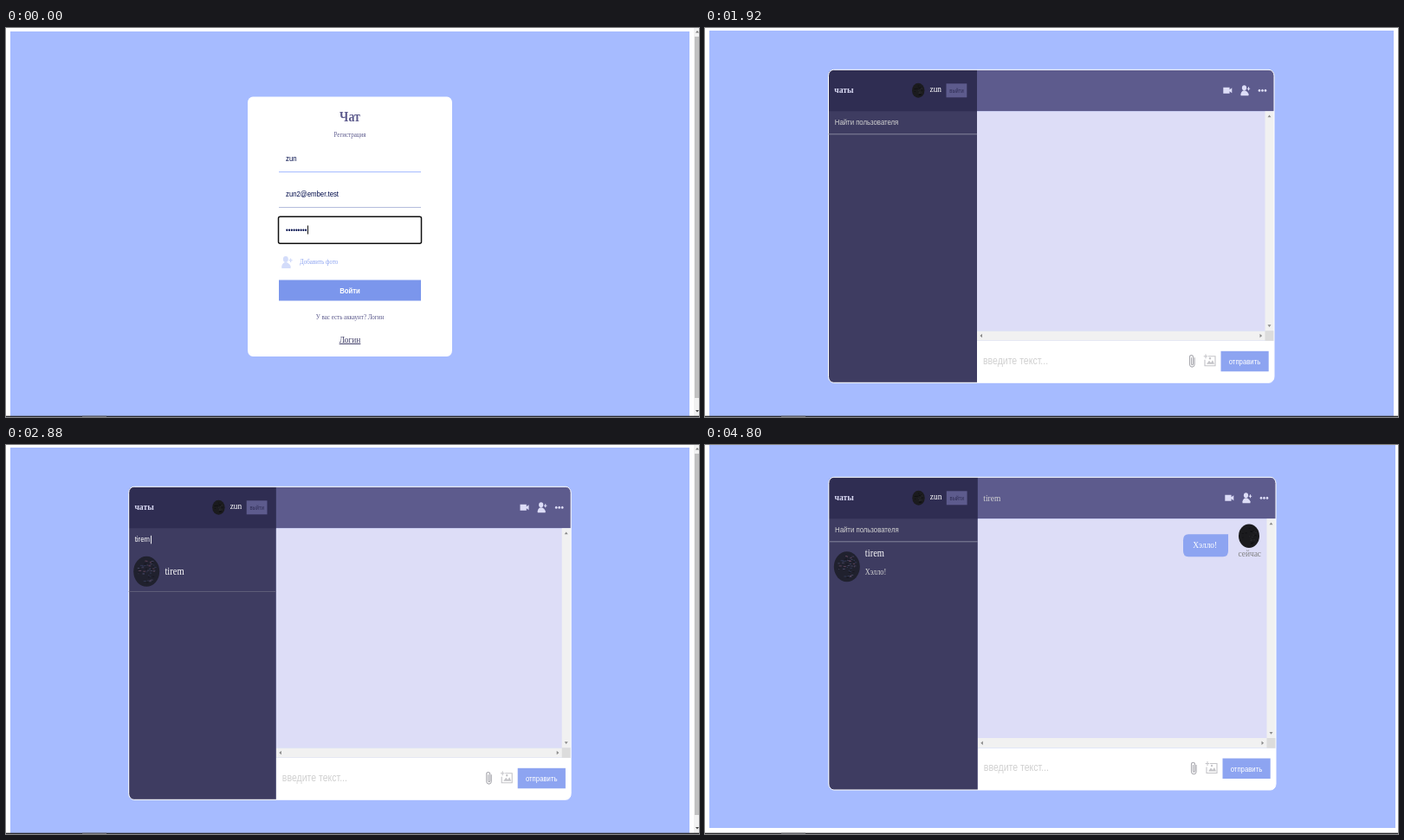
An HTML page for the animation above (5760 ms loop, 800x450 px).

```html
<!DOCTYPE html>
<html lang="ru">
<head>
<meta charset="utf-8">
<style>
  html, body { margin: 0; width: 100%; height: 100%; overflow: hidden; background: #fff; }
  svg { display: block; width: 800px; height: 450px; }
  .serif { font-family: "Liberation Serif", serif; }
  .sans { font-family: "Liberation Sans", sans-serif; }
  .ui { font-family: "Open Sans", sans-serif; }
</style>
</head>
<body>
<svg id="stage" viewBox="0 0 800 450"></svg>
<script>
const SCENE_MS = 960;
const ASPECT = 0.855; // the whole screen is squeezed horizontally
const USER = 'zun', EMAIL = 'zun2@ember.test', FRIEND = 'tirem', HELLO = 'Хэлло!';
const BLUE = '#a6bbff', BUTTON = '#8da4f1', PURPLE = '#5d5b8d', LILAC = '#ddddf7';

// x0, y0, x1, y1 are the edges of the box
const box = (x0, y0, x1, y1, fill, more = '') =>
  `<rect x="${x0}" y="${y0}" width="${x1 - x0}" height="${y1 - y0}" fill="${fill}" ${more}/>`;
const frame = (x0, y0, x1, y1, color, width = 1, fill = 'none') =>
  box(x0, y0, x1, y1, fill, `stroke="${color}" stroke-width="${width}"`);
const oval = (x, y, rx, ry, fill) => `<ellipse cx="${x}" cy="${y}" rx="${rx}" ry="${ry}" fill="${fill}"/>`;
const shape = (d, fill) => `<path d="${d}" fill="${fill}"/>`;
const line = (d, color, width = 1) => `<path d="${d}" fill="none" stroke="${color}" stroke-width="${width}"/>`;
const text = (x, y, str, size, fill, font = 'serif', more = '') =>
  `<text class="${font}" transform="translate(${x} ${y}) scale(${ASPECT} 1)" font-size="${size}" fill="${fill}" ${more}>${str}</text>`;
const middle = (x, y, str, size, fill, font, more = '') =>
  text(x, y, str, size, fill, font, 'text-anchor="middle" ' + more);
const at = (x, y, content) => `<g transform="translate(${x} ${y})">${content}</g>`;

function random(seed) {
  return () => (seed = (seed * 16807) % 2147483647) / 2147483647;
}

// Short random dashes inside an oval or a rectangle
function specks(x, y, rx, ry, colors, count, round, seed = 77) {
  const rnd = random(seed);
  let out = '';
  for (let i = 0; i < count; i++) {
    const u = rnd() * 2 - 1, v = rnd() * 2 - 1, w = 1 + rnd() * 2.2;
    if (round && u * u + v * v > 0.8) continue;
    const px = x + u * (rx - 1.6), py = y + v * (ry - 1);
    out += box(px - w / 2, py - 0.4, px + w / 2, py + 0.4, colors[i % colors.length]);
  }
  return out;
}

const darkAvatar = (x, y, rx, ry) =>
  oval(x, y, rx, ry, '#1b1b1e') + specks(x, y, rx, ry, ['#101012', '#29292c'], 40, true);
const codeAvatar = (x, y) =>
  oval(x, y, 15, 17.5, '#20212e') + specks(x, y, 15, 17.5, ['#4b4a68', '#16161f', '#6a4a63', '#353c5c'], 90, true);

const person = color =>
  oval(-1, -3, 2.6, 3, color) + shape('M-5 6V4Q-4 0-1 0T4 4V6Z', color) + line('M4-4V0M2.3-2H5.7', color, 1.1);

function page(right, top, bottom, content, bar) {
  let out = box(0, 0, 800, 450, '#fff') + box(5, top, right, bottom, BLUE) + content;
  if (bar) {
    out += box(bar, 0, 800, 449, '#f1f1f1') + box(bar + 1, 10, 800, 428, '#c1c1c1') +
      shape(`M${bar + 2} 5.5h4l-2-2.5z`, '#777') + shape(`M${bar + 2} 442h4l-2 2.5z`, '#444');
  }
  return out + box(0, 448.7, 800, 450, '#2b2b2e') + box(88, 448.7, 116, 450, '#66666c');
}

function signUp() {
  const c = 397;
  return box(279, 79.5, 515, 380, '#fff', 'rx="6" ry="7"') +
    middle(c, 108, 'Чат', 16.4, PURPLE, 'serif', 'font-weight="bold"') +
    middle(c, 126, 'Регистрация', 8.2, PURPLE) +
    text(323, 154, USER, 9.1, '#000c4a', 'sans') + box(315, 166, 479, 167, BLUE) +
    text(323, 195, EMAIL, 9.1, '#000c4a', 'sans') + box(315, 207, 479, 208, '#b4bddd') +
    box(314.5, 218.3, 479.5, 249.3, '#fff', 'rx="2" stroke="#101010" stroke-width="1.5"') +
    text(323, 237, '•'.repeat(9), 9.1, '#000c4a', 'sans') + box(348, 228.5, 349, 238.5, '#111') +
    at(324, 271, `<g transform="scale(1.15)">${person('#d3dcfa')}</g>`) +
    text(339, 273, 'Добавить фото', 8.2, BUTTON) +
    box(315, 291.5, 479, 315.5, '#7b96ec') +
    middle(c, 306.7, 'Войти', 9.1, '#fff', 'sans', 'font-weight="bold"') +
    middle(c, 336.7, 'У вас есть аккаунт? Логин', 8.2, PURPLE) +
    middle(c, 363.7, 'Логин', 11, '#43416a', 'serif', 'text-decoration="underline"');
}

const chevron = (x, y, color = '#aaa') => line(`M${x - 2.3} ${y - 1.3}l2.3 2.6 2.3-2.6`, color, 0.9);
const ui = (x, y, str, color = '#f2f2f2', more) => text(x, y, str, 8, color, 'ui', more);

function treeItems() {
  const items = [
    ['Видео', '#777f8c'], ['Документы', '#d8dde2'], ['Загрузки', '#2b8fdf'],
    ['Изображения', '#b9dcf3'], ['Музыка', '#2f9be8'], ['Объемные объекты', '#58bde8'],
    ['Рабочий стол', '#2486d0'], ['Локальный диск (C:)', '#c6cbd0'], ['Локальный диск (E:)', '#c6cbd0'],
  ];
  const icons = [
    c => box(-4, -4.5, 4, 4.5, c) + box(-2, -3, 2, 3, '#3c4b5e'),
    c => box(-3.5, -4.5, 3.5, 4.5, c) + line('M-2-2H2M-2 0H2M-2 2H2', '#4b88bd', 0.8),
    c => line('M0-4.5V1', c, 2.2) + shape('M-4 0H4L0 4.5Z', c),
    c => box(-4.5, -4, 4.5, 4, c) + shape('M-3.5 3L0-1 3.5 3Z', '#35638a'),
    c => line('M-1 3V-4.5Q0-2 3-1', c, 1.5) + oval(-2, 3, 2, 1.7, c),
    c => shape('M0-5L4.5-2.5V2.5L0 5-4.5 2.5V-2.5Z', c) + shape('M0 0L4.5-2.5V2.5L0 5Z', '#2a82b8'),
    c => box(-4.5, -3.5, 4.5, 3.5, c),
    c => box(-4.5, 0, 4.5, 4, c) + box(-3, -4, 0, -1, '#2b9be6') + box(-3, 1.6, 3, 2.6, '#333'),
    c => shape('M-3-2H3L4.5 1V4H-4.5V1Z', c) + box(-3, 1.6, 3, 2.6, '#333'),
  ];
  return items.map(([name, color], i) => {
    const y = 140.5 + i * 16.27;
    return at(212.5, y - 3, icons[i](color)) + ui(220, y, name);
  }).join('');
}

function fileLabel(x, ...lines) {
  return lines.map((s, i) => middle(x, 164.5 + i * 10, s, 8, '#f2f2f2', 'ui')).join('');
}

function thumbnails() {
  const coin = box(457, 119, 510, 154, 'url(#gold)') +
    specks(483.5, 136.5, 26, 17, ['#6b3d20', '#d39b5c', '#8d552d', '#e8c89a'], 130) +
    oval(484, 135, 11.5, 13, '#d99a3d');
  const cubes = box(327, 118.5, 381, 154, '#151516') +
    specks(354, 136, 26, 17, ['#29292b', '#0c0c0d', '#222224'], 120, false, 19);
  const desk = box(392, 119, 446, 154, '#11131f') + shape('M392 119H414L401 138 392 141Z', '#4b3330') +
    shape('M419 122L446 119V150L424 146Z', '#51608d') + shape('M424 124L429 123V145L426 145Z', '#c5cbe0') +
    shape('M396 145L420 139 434 149 405 153Z', '#b6b6c4') + box(434, 126, 443, 129, '#a9b5d8');
  const code = box(522, 113, 575, 154, '#172337') +
    specks(548.5, 133.5, 26, 20, ['#315477', '#3b6c8c', '#7a4c45', '#293d60', '#447a77'], 150, false, 31);
  return cubes + desk + coin + code;
}

function fileDialog() {
  const gray = '#8c8c8c';
  return '<defs><linearGradient id="gold"><stop stop-color="#8a5229"/><stop offset=".6" stop-color="#c58643"/>' +
    '<stop offset="1" stop-color="#70401f"/></linearGradient></defs>' +
    box(189, 15, 584, 336, '#202020', 'style="filter:drop-shadow(0 2px 4px #0008)"') +
    // title and navigation
    box(189, 15, 584, 38, '#000') + oval(199, 25.5, 4.2, 4.8, '#db4437') + ui(206.5, 28.7, 'Открытие') +
    line('M572 22.3l5.5 6M577.5 22.3l-5.5 6', '#fff') +
    box(189, 38, 584, 64, '#191919') + box(189, 64, 584, 86, '#1d1f21') +
    line('M205 49.5h-8m3.5-3.7l-3.5 3.7 3.5 3.7M214 49.5h8m-3.5-3.7l3.5 3.7-3.5 3.7', gray, 1.2) +
    chevron(232, 49.5, gray) + line('M244 54.5v-9m-3.3 4l3.3-4 3.3 4', '#fff', 1.3) +
    frame(252.5, 39.5, 453.5, 59.5, '#535353') + box(254.5, 43, 261, 55, '#f3d7a2') + box(259, 46, 263, 55, '#fff0d3') +
    ui(266, 52, '«') + ui(276, 52.3, 'Изо...') + line('M300.3 47.5l2 2.2-2 2.2', '#ddd', 0.9) +
    ui(307.5, 52.3, 'Сохраненные фотогра...') + chevron(421, 50) +
    line('M442 47a2.8 3.2 0 1 1-3.4 0M442.5 44.7v3h-3', '#aaa', 0.9) +
    frame(457.5, 39.5, 576.5, 59.5, '#535353') +
    line('M465.5 53l3-3.5a2.4 2.7 0 1 1 .6.6', gray, 0.9) + ui(481, 52.3, 'Поиск в: Сохраненные фот...', gray) +
    // command row
    ui(199.5, 77.5, 'Упорядочить') + shape('M245.5 73.5h5l-2.5 3z', '#ddd') + ui(268.5, 77.5, 'Новая папка') +
    box(512, 71, 520.5, 79, '#d8e8f4') + box(513, 75, 517, 78, '#3f83b4') + shape('M526.5 73.5h5l-2.5 3z', '#ddd') +
    box(544, 71, 553.5, 79, '#e9eef2') + box(549, 72, 553, 78.5, '#4596d4') +
    oval(570, 75, 4.6, 5.3, '#2576bd') + middle(570, 78, '?', 8, '#fff', 'ui', 'font-weight="bold"') +
    // folder tree
    box(189, 86, 302, 284, '#191919') + box(189, 179, 302, 194.5, '#333') +
    oval(208, 99.5, 4.3, 4.3, '#1683d8') + ui(216, 102.2, 'LoftVolt - Personal') +
    box(203.5, 116, 213, 123, '#36a2e4') + box(206, 124, 211, 125.5, '#c3d3de') + ui(216, 124, 'Этот компьютер') +
    treeItems() + box(302, 86, 313, 284, '#171717') + box(303, 166, 312, 262, '#4d4d4d') +
    line('M305.5 93l2-2.5 2 2.5M305.5 277.5l2 2.5 2-2.5', '#999', 0.9) +
    // files
    box(388.5, 90, 450.5, 179, '#4d4d4d') + thumbnails() +
    fileLabel(354, 'kub_temnyj_tekst', 'ura_formy_11995', '6_1366x768') +
    fileLabel(419, 'photo_2021-05-1', '1_11-53-40') + fileLabel(484, 'photo_2021-05-1') +
    fileLabel(549, 'photo_2021-05-2', '7_08-30-22') +
    frame(427.5, 159.5, 518, 192.5, '#767676', 0.9, '#2b2b2b') +
    ui(430.5, 168.7, 'Тип элемента: Файл "JPG"') + ui(430.5, 178.7, 'Разрешение: 1280 x 720') +
    ui(430.5, 188.7, 'Размер: 91,8 КБ') +
    // footer
    box(189, 284, 584, 336, '#383838') + ui(304.5, 301.3, 'Имя файла:', '#f2f2f2', 'text-anchor="end"') +
    frame(307.5, 290.5, 455, 306, '#a0a0a0') + box(310.5, 293, 311.3, 303, '#ddd') + chevron(450, 299) +
    frame(462.5, 290.5, 573.5, 305.5, '#858585', 1, '#333') + ui(465, 301.3, 'Все файлы') + chevron(568.5, 298.5) +
    frame(462.8, 310.8, 514, 327, '#fff', 1.5, '#333') + middle(488.3, 321.3, 'Открыть', 8, '#fff', 'ui') +
    frame(522, 310.5, 573.5, 327, '#b5b5b5', 1.2, '#333') + middle(547.8, 321.3, 'Отмена', 8, '#fff', 'ui') +
    [[580, 329], [578, 331], [580, 331], [576, 333], [578, 333], [580, 333]]
      .map(([x, y]) => box(x, y, x + 1, y + 1, '#aaa')).join('');
}

// l, t, r, b: edges of the chat window
function chat({ l, t, r, b, search, draft, title = '', rows = '', messages = '' }) {
  const d = l + (r - l) / 3, gray = '#8b8b8b', pale = '#c4c4c8';
  const caret = (x, y, h, color) => box(x, y - h, x + 0.9, y + 2, color);
  const round = 'rx="6" ry="7"';
  return `<clipPath id="window">${box(l, t, r, b, '#000', round)}</clipPath><g clip-path="url(#window)">` +
    box(l, t, d, b, '#3e3c61') + box(l, t, d, t + 48, '#2f2d52') + box(d, t, r, t + 48, PURPLE) +
    box(d, t + 48, r, b - 60, LILAC) + box(d, b - 48.5, r, b, '#fff') +
    // scroll bars
    box(r - 10.5, t + 48, r, b - 60, '#f1f1f1') + box(d, b - 60, r, b - 48.5, '#f1f1f1') +
    box(r - 10.5, b - 60, r, b - 48.5, '#dcdcdc') +
    shape(`M${r - 7.5} ${t + 55}h4l-2-2.8zM${r - 7.5} ${b - 67}h4l-2 2.8z` +
      `M${d + 6} ${b - 56.5}v4.4l-2.6-2.2zM${r - 16.5} ${b - 56.5}v4.4l2.6-2.2z`, gray) + '</g>' +
    box(l, t, r, b, 'none', round + ' stroke="#fff"') +
    // headers
    text(l + 6.7, t + 27, 'чаты', 11.3, LILAC, 'serif', 'font-weight="bold"') + darkAvatar(l + 103.7, t + 24, 7.2, 8.5) +
    text(l + 117, t + 25.8, USER, 11, '#fff') + box(l + 136, t + 16, l + 159.8, t + 32, PURPLE) +
    middle(l + 148, t + 26.5, 'выйти', 6.8, '#302e55', 'sans') + text(d + 6.5, t + 28, title, 11, '#d3d3d3') +
    at(r - 53.7, t + 24, shape('M-5-3.5H2.3V-1L5-3V3L2.3 1V3.5H-5Z', LILAC)) +
    at(r - 33.5, t + 24, person(LILAC)) +
    [-17, -13.5, -10].map(x => oval(r + x, t + 24, 1.3, 1.5, LILAC)).join('') +
    // sidebar
    (search ? text(l + 7, t + 64, search, 9.1, '#fff', 'sans') + caret(l + 25.3, t + 64, 7.5, '#fff')
            : text(l + 7.3, t + 64, 'Найти пользователя', 9.1, '#d3d3d3', 'sans') +
              box(l, t + 74, d, t + 75, '#85849c')) +
    at(l, t, rows) + at(r, t, messages) +
    // message input
    (draft ? text(d + 7, b - 21.7, draft, 12.3, '#2f2d62', 'sans') + caret(d + 40.8, b - 21.7, 10, '#2f2d62')
           : text(d + 7, b - 21.7, 'введите текст...', 12.3, '#d0d0d0', 'sans')) +
    at(r - 94.7, b - 25, line('M2.8-4V3.5a2.8 3.3 0 0 1-5.6 0V-4.5a2 2.3 0 0 1 4 0V3a1 1.3 0 0 1-2 0V-4', '#aaaab0', 1.1)) +
    at(r - 74, b - 25.5, line('M-2-5H6V6H-6V-1', pale, 1.1) + shape('M-4 4L-1 0 1 2.4 3-.5 5 4Z', pale) +
      line('M-5-7.5v5M-7.3-5h4.6', pale) + oval(0, -2.5, 1.1, 1.2, pale)) +
    box(r - 61.5, b - 36.5, r - 6.3, b - 13, BUTTON) + middle(r - 34, b - 21.5, 'отправить', 9.1, '#fff', 'sans');
}

const contact = nameY => codeAvatar(20.5, 98) + text(41.7, nameY, FRIEND, 12.3, '#fff');
const sent =
  shape('M-101 66H-55V85Q-55 92-61 92H-101Q-107 92-107 85V73Q-107 66-101 66Z', BUTTON) +
  text(-95.7, 82, HELLO, 11, '#fff') + darkAvatar(-31, 68, 12, 13.7) + text(-43.5, 92, 'сейчас', 11, '#808080');

const scenes = [
  page(789, 4, 449, signUp(), 794),
  page(793, 0, 443, at(2, -11.8, signUp()) + fileDialog() + box(798.7, 20, 800, 437, '#c9c9c9')),
  page(795, 3, 449, chat({ l: 142.5, t: 48.3, r: 657, b: 410.3 })),
  page(789, 3, 449, chat({
    l: 141.7, t: 48.3, r: 652.2, b: 410.3, search: FRIEND,
    rows: contact(101.7) + box(0, 120.7, 170, 121.5, '#66647f'),
  }), 794),
  page(791, 5.5, 449, chat({ l: 142, t: 49.8, r: 654.2, b: 410.7, draft: HELLO, rows: contact(97.2) }), 796),
  page(797, 0, 443, chat({
    l: 142.8, t: 37.3, r: 659, b: 399, title: FRIEND, messages: sent,
    rows: at(0.5, 5.5, codeAvatar(20.5, 98)) + text(42, 92, FRIEND, 12.3, '#fff') + text(42, 112.7, HELLO, 9.6, '#d3d3d3'),
  })),
];

const stage = document.getElementById('stage');
let shown = -1;
function draw() {
  const index = Math.floor(performance.now() / SCENE_MS) % scenes.length;
  if (index !== shown) stage.innerHTML = scenes[shown = index];
  requestAnimationFrame(draw);
}
draw();
</script>
</body>
</html>
```
